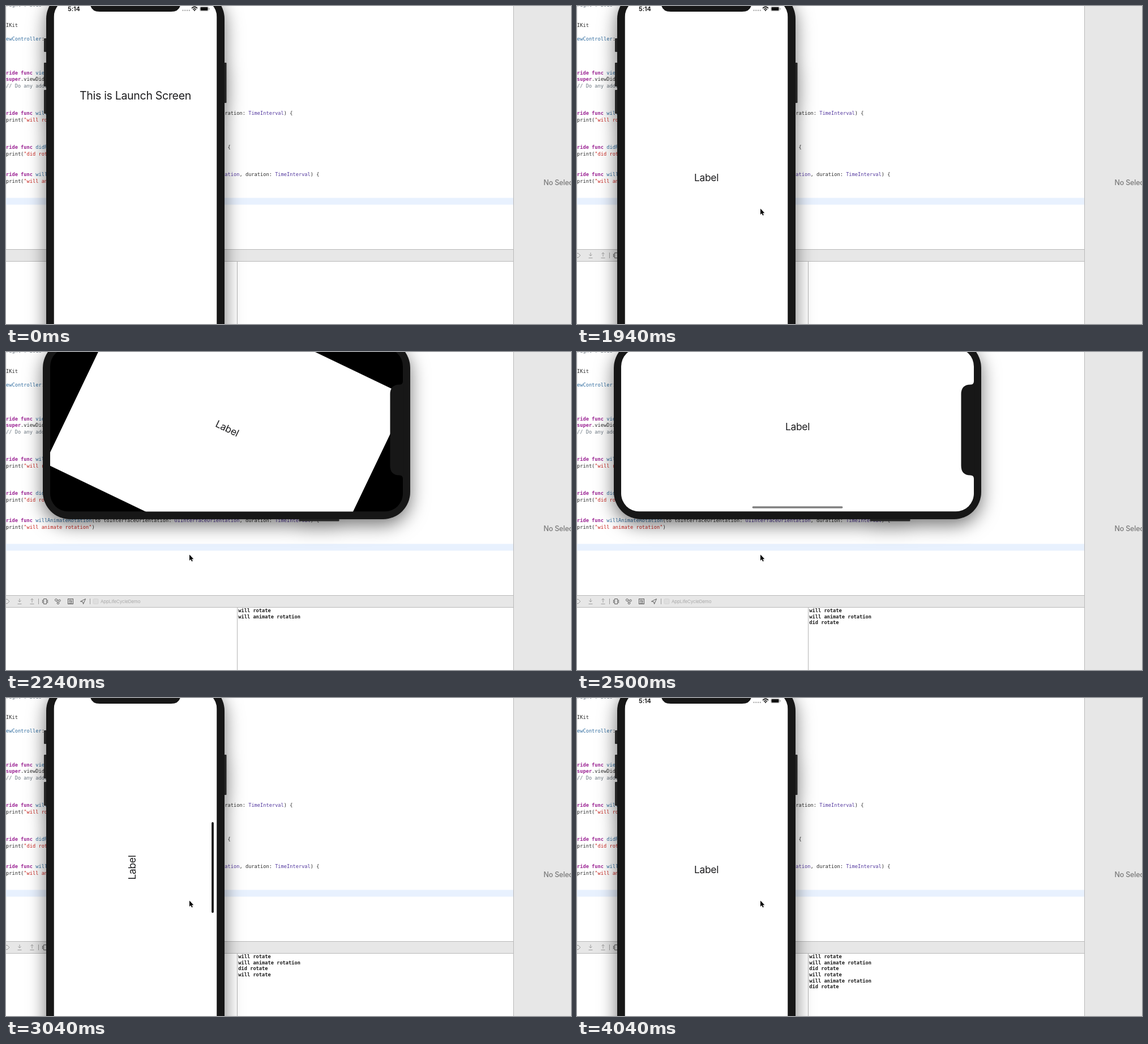
Write an HTML page that moves like this. It is 998 px wide and 561 px high and loops after 4.08 s.

```html
<!DOCTYPE html>
<html lang="en">
<head>
<meta charset="utf-8">
<title>Rotation callbacks</title>
<style>
  html, body { margin: 0; width: 100%; height: 100%; overflow: hidden; background: #fff; }
  svg { display: block; width: 100%; height: 100%; }
  text { font-family: Inter, "Open Sans", sans-serif; }
  .mono text { font: 8.69px "DejaVu Sans Mono", monospace; white-space: pre; fill: #2b2b2b; }
  .mono .k { font-weight: bold; fill: #9b2393; }
  .mono .f { fill: #2f6c9f; }
  .mono .t { fill: #54399f; }
  .mono .s { fill: #c8251f; }
  .mono .c { fill: #6b7680; }
  #console text { font-weight: bold; fill: #1c1c1c; }
  .shadow { filter: drop-shadow(0 10px 16px rgba(0, 0, 0, .55)); }
  .line { fill: none; stroke: #5c5c5c; stroke-width: 1; }
  .dim { stroke: #9c9c9c; }
  .mid { text-anchor: middle; fill: #1c1c1e; letter-spacing: -.3px; }
</style>
</head>
<body>
<svg viewBox="0 0 998 561">
  <defs>
    <clipPath id="screen"><rect x="-144" y="-311.5" width="288" height="623" rx="32"/></clipPath>
  </defs>

  <rect width="998" height="561" fill="#fff"/>
  <rect width="1" height="429" fill="#efefef"/>
  <rect y="338.5" width="896" height="12" fill="#e8f1fe"/>
  <g id="code" class="mono"></g>

  <rect y="429" width="896" height="22" fill="#b9b9b9"/>
  <rect y="430" width="896" height="20" fill="#e7e7e7"/>
  <rect x="408" y="451" width="1" height="110" fill="#b5b5b5"/>
  <rect x="896" width="102" height="561" fill="#e7e7e7"/>
  <rect x="896" width="1" height="561" fill="#b9b9b9"/>
  <text x="949.5" y="315.7" font-size="12.5" font-weight="500" letter-spacing="-.2" fill="#7b7b7b">No Selection</text>

  <g id="tools">
    <path class="line dim" d="M-2 437 2 436 6 440 2 444-2 443M24 435v6m-2.5-2.5L24 441l2.5-2.5M20.500 444.500h7M46 442v-7m-2.500 2.500L46 435l2.500 2.500M42.500 444.500h7"/>
    <path class="line dim" d="M57.500 435v10M148.500 435v10"/>
    <path class="line" d="M66.500 435.500h5v9h-5zM64.500 437v6M73.500 437v6"/>
    <g class="line">
      <circle cx="88.500" cy="437.500" r="2"/><circle cx="94.500" cy="438.500" r="1.700"/><circle cx="92" cy="443" r="1.800"/>
      <path d="M90.500 438h2M89.500 439.500l1.500 2"/>
      <rect x="109.500" y="435.500" width="9" height="9"/>
      <path d="M111 438h6M111 440.500h6M111 443h6M113 437v2M115.500 439.500v2"/>
      <path d="M140.500 435.500l-9 4.500 4 .7 1 4z"/>
    </g>
    <rect x="154" y="435.500" width="9" height="9" rx="1.500" fill="#dedede" stroke="#d0d0d0" stroke-width=".7"/>
    <text x="167" y="443" font-size="8" letter-spacing="-.15" fill="#a9a9a9">AppLifeCycleDemo</text>
  </g>
  <g id="console" class="mono"></g>

  <g id="device" class="shadow">
    <g class="turn">
      <g fill="#252525">
        <rect x="-161.500" y="-242" width="8" height="24" rx="1"/>
        <rect x="-161.500" y="-199" width="8" height="42" rx="1"/>
        <rect x="-161.500" y="-151" width="8" height="42" rx="1"/>
        <rect x="153.500" y="-199" width="7.500" height="71" rx="1"/>
      </g>
      <rect x="-157.500" y="-324.500" width="315" height="649" rx="48" fill="#171717"/>
    </g>
  </g>
  <g id="display">
    <g class="turn">
      <g clip-path="url(#screen)">
        <rect x="-144" y="-311.500" width="288" height="623" fill="#000"/>
        <g id="content">
          <rect id="page" fill="#fff"/>
          <text id="launch" class="mid" y="-133.800" font-size="19.500">This is Launch Screen</text>
          <text id="label" class="mid" font-size="17.400">Label</text>
          <rect id="indicator" x="-80" y="134.700" width="160" height="3.600" rx="1.800"/>
          <g id="status" fill="#111">
            <text x="-119.500" y="-290.200" font-size="11" font-weight="600" letter-spacing="-.1">5:14</text>
            <path d="M82.800-291.200h14" stroke="#aaa" stroke-width="2" stroke-dasharray="2.300 1.500"/>
            <g transform="translate(104.500 -290.500)" fill="none" stroke="#111" stroke-width="1.700">
              <path d="M-5-4.600Q0-9.400 5-4.600M-2.900-2.300Q0-5 2.900-2.300"/>
              <path d="M-1.200-1 0 .3 1.200-1z" stroke-width="1"/>
            </g>
            <rect x="114" y="-298" width="15" height="8" rx="2.200" fill="none" stroke="#aaa" stroke-width=".8"/>
            <rect x="115" y="-297" width="13" height="6" rx="1.300"/>
            <rect x="130" y="-295.500" width="1.200" height="3" rx=".6" fill="#999"/>
          </g>
        </g>
      </g>
      <path fill="#171717" d="M-86-313v1.500q6 0 6 6Q-80-289-63-289H63Q80-289 80-305.500q0-6 6-6v-1.500z"/>
    </g>
  </g>

  <path id="cursor" d="M0 0v10.500l2.400-2.200 1.700 3.700 1.700-.8-1.700-3.500h3.200z" stroke="#fff" stroke-width=".9" paint-order="stroke"/>
</svg>

<script>
const LOOP = 4080;
const $ = id => document.getElementById(id);
const clamp = v => Math.min(1, Math.max(0, v));
const lerp = (a, b, p) => a + (b - a) * p;
const ramp = (t, start, length) => clamp((t - start) / length);
const smooth = p => p * p * (3 - 2 * p);
const show = (id, alpha) => $(id).setAttribute('opacity', +alpha);

function addText(parent, x, y, parts) {
  const text = document.createElementNS('http://www.w3.org/2000/svg', 'text');
  text.setAttribute('x', x);
  text.setAttribute('y', y);
  for (const [kind, string] of parts) {
    const span = document.createElementNS(text.namespaceURI, 'tspan');
    if (kind) span.setAttribute('class', kind);
    span.textContent = string;
    text.append(span);
  }
  parent.append(text);
  return text;
}

const method = (name, args, rest) => [
  ['k', 'ride func '], ['f', name], ['', `(${args}: `], ['t', 'UIInterfaceOrientation'], ...rest];
const timed = [['', ', duration: '], ['t', 'TimeInterval'], ['', ') {']];
const print = message => [['', 'print('], ['s', `"${message}"`], ['', ')']];

const source = {
  0: [['c', 'right © 2018 ']],
  3: [['', 'IKit']],
  5: [['f', 'ewController'], ['', ': '], ['t', 'UIViewController'], ['', ' {']],
  10: [['k', 'ride func '], ['f', 'viewDidLoad'], ['', '() {']],
  11: [['k', 'super'], ['', '.viewDidLoad()']],
  12: [['c', '// Do any additional setup after loading the view.']],
  16: method('willRotate', 'to toInterfaceOrientation', timed),
  17: print('will rotate'),
  21: method('didRotate', 'from fromInterfaceOrientation', [['', ') {']]),
  22: print('did rotate'),
  25: method('willAnimateRotation', 'to toInterfaceOrientation', timed),
  26: print('will animate rotation'),
};
for (const row in source) addText($('code'), 0, 0.8 + row * 11.97, source[row]);

const log = [
  [2000, 'will rotate'], [2000, 'will animate rotation'], [2400, 'did rotate'],
  [3000, 'will rotate'], [3070, 'will animate rotation'], [3450, 'did rotate'],
].map(([time, message], row) => ({
  time, node: addText($('console'), 410.3, 459.2 + row * 10.58, [['', message]]),
}));

// Pointer path as [time, x, y]
const pointer = [[30, 512, 526], [530, 426, 434], [700, 324, 357.5], [LOOP, 324, 357.5]];

function movePointer(t) {
  const next = Math.max(1, pointer.findIndex(p => p[0] > t));
  const [a, b] = [pointer[next - 1], pointer[next]];
  const p = ramp(t, a[0], b[0] - a[0]);
  $('cursor').setAttribute('transform', `translate(${lerp(a[1], b[1], p)} ${lerp(a[2], b[2], p)})`);
}

function render(t) {
  const landscape = t >= 2000 && t < 3000;
  const place = landscape ? 'translate(389.5 137.5)' : 'translate(228.5 299)';
  $('device').setAttribute('transform', place);
  $('display').setAttribute('transform', place);
  document.querySelectorAll('.turn').forEach(g => g.setAttribute('transform', `rotate(${landscape ? 90 : 0})`));

  // 0 = upright page, 1 = page turned sideways within the device
  const turn = smooth(ramp(t, 2000, 372)) - smooth(ramp(t, 3070, 372));
  const halfW = lerp(144, 311.5, turn), halfH = lerp(311.5, 144, turn);
  $('content').setAttribute('transform', `rotate(${-90 * turn})`);
  const box = { x: -halfW, y: -halfH, width: 2 * halfW, height: 2 * halfH };
  for (const key in box) $('page').setAttribute(key, box[key]);

  const loaded = ramp(t, 1400, 250);
  show('launch', 1 - loaded);
  show('label', loaded);
  $('label').setAttribute('y', 6.3 + lerp(4, -6, turn));

  const fade = ramp(t, 2420, 240);
  show('indicator', t < 3070 ? 1 - (1 - fade) ** 1.7 : 0);
  show('status', t < 2000 ? 1 : ramp(t, 3380, 90));

  show('tools', t >= 30);
  show('cursor', t >= 30);
  movePointer(t);
  for (const { time, node } of log) node.setAttribute('opacity', +(t >= time));
}

const begin = performance.now();
function tick() {
  render((performance.now() - begin) % LOOP);
  requestAnimationFrame(tick);
}
tick();
</script>
</body>
</html>
```
